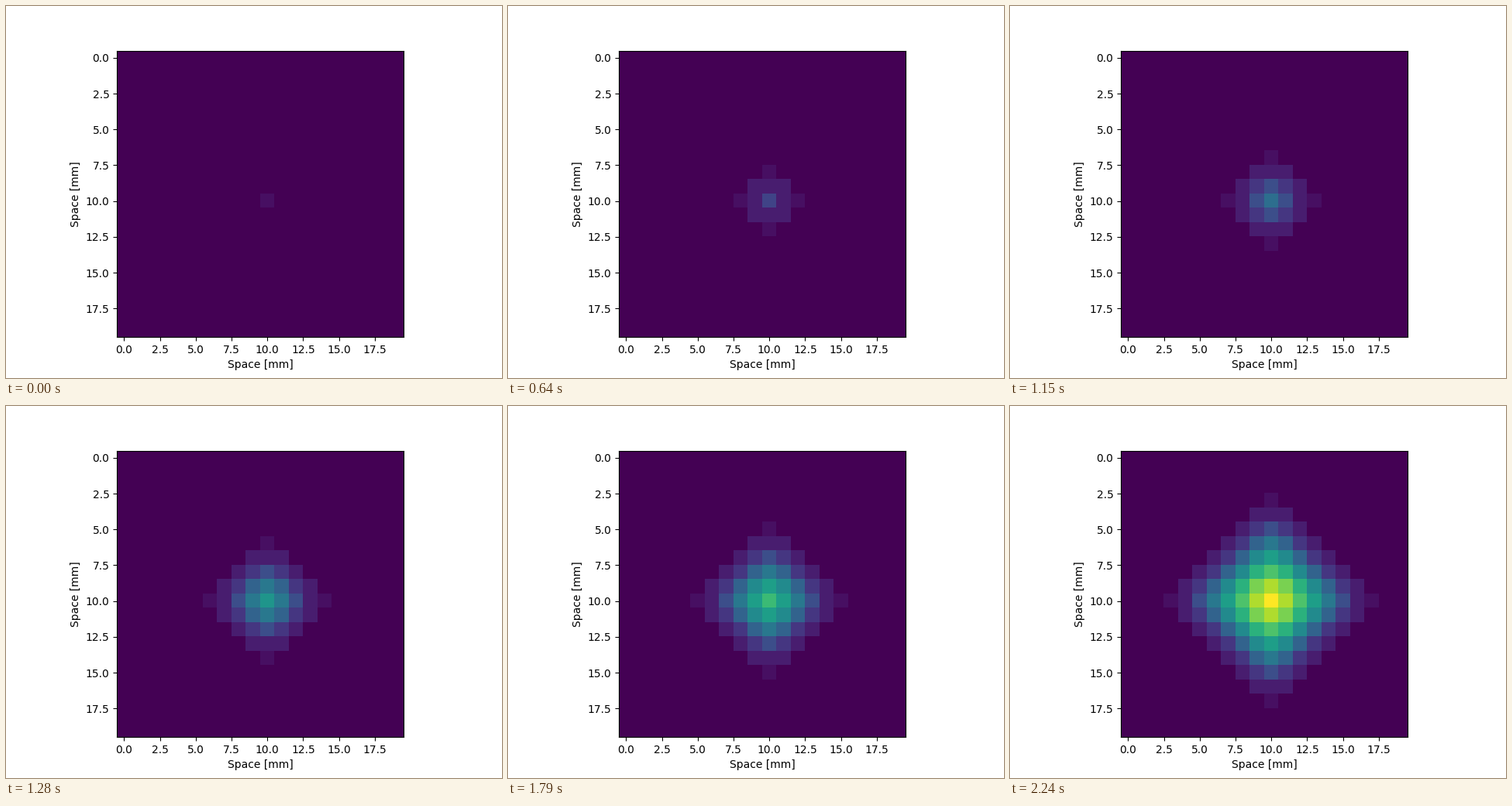
Recreate the animation shown at these times as a matplotlib script. Size 640x480 px, loop 2.56 s.

```python
import numpy as np
import matplotlib.pyplot as plt
from matplotlib.animation import FuncAnimation

SIZE = 20
STEPS = 8
STEP_MS = 320

plt.rcParams["font.family"] = "DejaVu Sans"


def spread(grid):
    """Each cell gains one unit for every warm neighbour."""
    warm = np.pad((grid > 0).astype(int), 1)
    gain = warm[:-2, 1:-1] + warm[2:, 1:-1] + warm[1:-1, :-2] + warm[1:-1, 2:]
    return grid + gain


def grid_at(step):
    grid = np.zeros((SIZE, SIZE), dtype=int)
    grid[SIZE // 2, SIZE // 2] = 1
    for _ in range(step):
        grid = spread(grid)
    return grid


fig, ax = plt.subplots(figsize=(6.4, 4.8), dpi=100)
image = ax.imshow(grid_at(0), cmap="viridis", vmin=0,
                  vmax=grid_at(STEPS - 1).max(), interpolation="nearest")
ax.set_xlabel("Space [mm]")
ax.set_ylabel("Space [mm]")


def update(step):
    image.set_data(grid_at(step))
    return [image]


anim = FuncAnimation(fig, update, frames=STEPS, interval=STEP_MS,
                     init_func=lambda: update(0), repeat=True, repeat_delay=0)
plt.show()
```
